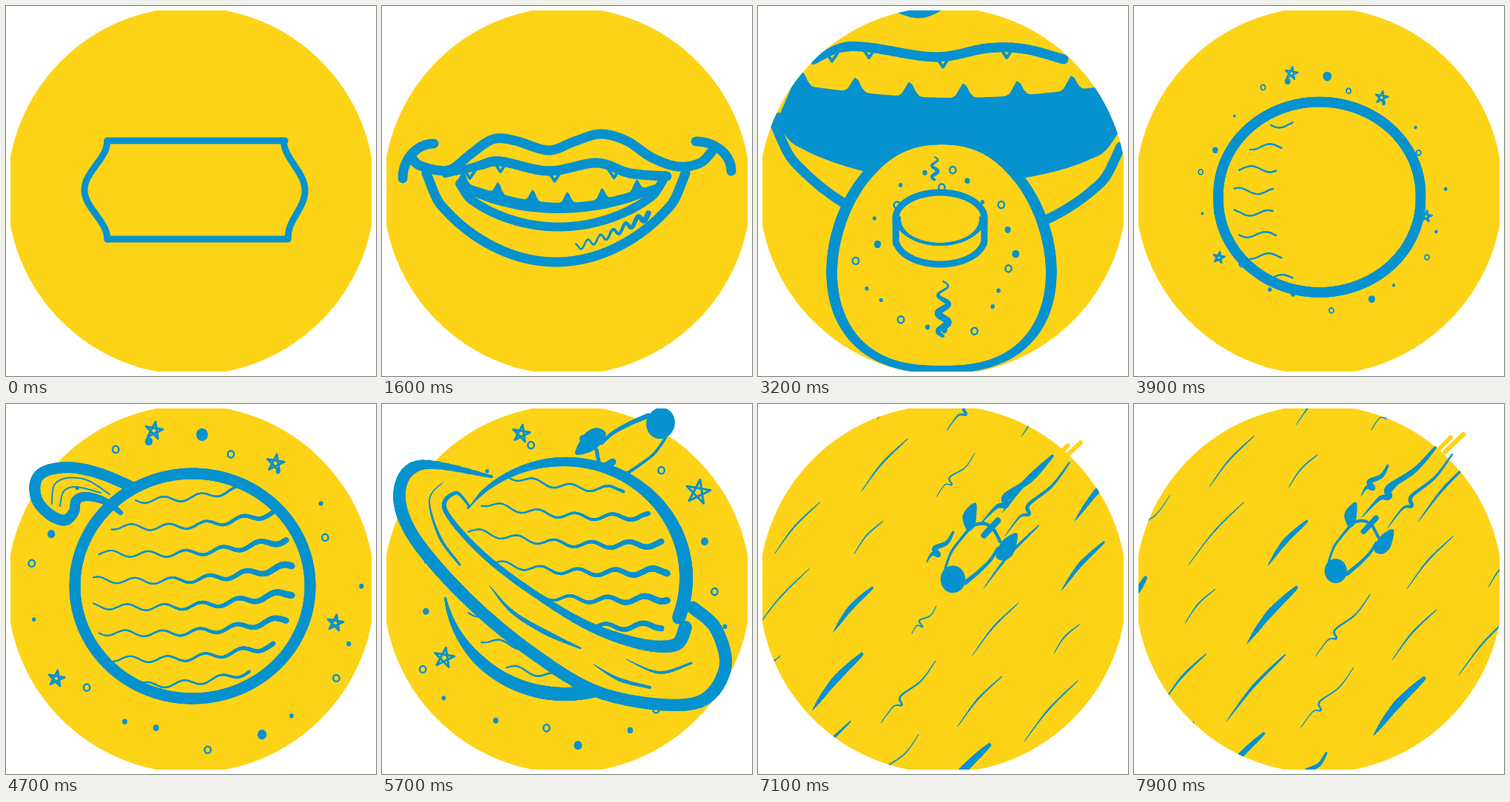
Write an HTML page with a canvas that moves like this. It is 500x500 px and loops after 8 s.

```html
<!DOCTYPE html>
<html lang="en">
<head>
<meta charset="utf-8">
<title>Mouth, planet, comet</title>
<style>
html, body { margin: 0; width: 100%; height: 100%; overflow: hidden; background: #fff; }
canvas { display: block; width: 500px; height: 500px; }
</style>
</head>
<body>
<canvas id="stage" width="500" height="500"></canvas>
<script>
const ctx = document.getElementById('stage').getContext('2d');
const BLUE = '#0692ce', YELLOW = '#fdd317', LOOP = 8000;
const { PI, sin, cos, abs, max, min, round, floor, sqrt } = Math;

// ---------- helpers ----------
const P = s => s.split(' ').map(q => q.split(',').map(Number));
const mix = (a, b, k) => Array.isArray(a) ? a.map((v, i) => mix(v, b[i], k)) : a + (b - a) * k;
const steps = (n, f) => Array.from({ length: n + 1 }, (_, i) => f(i / n, i));
const polar = (x, y, r, a) => [x + r * cos(a), y + r * sin(a)];

// Pose number k (may be fractional) from a list of poses
function pose(k, list) {
  const i = min(floor(k), list.length - 2);
  return mix(list[i], list[i + 1], k - i);
}

// Line between two points that sags by a rounded depth
const bow = (x0, y0, x1, y1, depth = 0, power = 0.6) => steps(24, u =>
  [mix(x0, x1, u), mix(y0, y1, u) + depth * max(0, sin(PI * u)) ** power]);

// Piecewise linear value from time/value pairs
function track(t, keys) {
  if (t <= keys[0]) return keys[1];
  for (let i = 2; i < keys.length; i += 2)
    if (t <= keys[i]) return mix(keys[i - 1], keys[i + 1], (t - keys[i - 2]) / (keys[i] - keys[i - 2]));
  return keys[keys.length - 1];
}

function random(seed) {
  return () => {
    seed = (seed * 16807) % 2147483647;
    return seed / 2147483647;
  };
}

function spline(p, closed) {
  const n = p.length, out = [], last = closed ? n : n - 1;
  const at = i => closed ? p[(i + n) % n] : p[max(0, min(n - 1, i))];
  for (let i = 0; i < last; i++) {
    const [a, b, c, d] = [at(i - 1), at(i), at(i + 1), at(i + 2)];
    for (let u = 0; u < 1; u += 0.125)
      out.push([0, 1].map(j => 0.5 * (2 * b[j] + (c[j] - a[j]) * u
        + (2 * a[j] - 5 * b[j] + 4 * c[j] - d[j]) * u * u
        + (3 * b[j] - a[j] - 3 * c[j] + d[j]) * u * u * u)));
  }
  out.push(at(last));
  return out;
}

function trace(s) {
  ctx.beginPath();
  s.forEach(p => ctx.lineTo(p[0], p[1]));
}

function stroke(s, w, color = BLUE) {
  trace(s);
  ctx.lineWidth = w;
  ctx.strokeStyle = color;
  ctx.stroke();
}

function fill(s, color = BLUE) {
  trace(s);
  ctx.fillStyle = color;
  ctx.fill();
}

// Brush line; w is one width or a width profile along the line
function ink(pts, w, to = 1) {
  const s = spline(pts), n = s.length - 1, end = round(n * to);
  if (end < 1) return;
  if (!Array.isArray(w)) return stroke(s.slice(0, end + 1), w);
  for (let i = 0; i < end; i++) {
    const f = i / n * (w.length - 1), k = floor(f);
    stroke([s[i], s[i + 1]], mix(w[k], w[min(k + 1, w.length - 1)], f - k));
  }
}

function dot(x, y, r, hollow) {
  ctx.beginPath();
  ctx.ellipse(x, y, r, r * 1.1, 0, 0, 7);
  ctx.fillStyle = ctx.strokeStyle = BLUE;
  ctx.lineWidth = 2.5;
  hollow ? ctx.stroke() : ctx.fill();
}

// Dots spread around a centre between two radii, one in three hollow
function scatter(seed, n, x, y, near, far, size) {
  const rnd = random(seed);
  for (let i = 0; i < n; i++) {
    const [px, py] = polar(x, y, mix(near, far, rnd()), i * 2.4 + seed);
    const hollow = i % 3 === 0;
    dot(px, py, hollow ? 4.2 : 2.5 + size * rnd() ** 2, hollow);
  }
}

const star = ([x, y, r]) => stroke(steps(5, (_, i) => polar(x, y, r, i * PI * 0.8 - 1.4)), 3);

function wave(x0, y0, x1, y1, w, { to = 1, amp = 4, len = 50, phase = -1.2 } = {}) {
  const span = x1 - x0;
  ink(steps(max(4, round(span / len * 6)), u => [mix(x0, x1, u),
    mix(y0, y1, u) + amp * sin(u * span / len * 2 * PI + phase) + span / 30 * sin(PI * u)]),
  [2, 2.5, w * 0.6, w], to);
}

// Slanted speed line, optionally with a lightning kink
function bolt([x0, y0], [x1, y1], w, kink) {
  const at = (u, side) => [mix(x0, x1, u) + side * 0.75, mix(y0, y1, u) + side * 0.66];
  ink(kink ? [at(0, 0), at(0.25, -2), at(0.33, 5), at(0.4, -4), at(0.7, 3), at(1, 0)]
    : [at(0, 0), at(0.5, -4), at(1, 0)], [1, w * 0.7, w, w * 0.8, w * 0.4]);
}

function scoped(draw) {
  ctx.save();
  draw();
  ctx.restore();
}

function disc() {
  ctx.beginPath();
  ctx.arc(250, 250, 248.3, 0, 7);
}

function inDisc(draw) {
  scoped(() => { disc(); ctx.clip(); draw(); });
}

// ---------- mouth ----------
const lipTop = P('40,205 50,215 75,222 95,220 120,200 150,180 180,182 225,195 260,183 295,173 330,182 365,205 400,217 430,212 447,195');
const innerTop = [P('85,228 130,216 160,210 225,223 290,212 335,226 385,230'),
  P('75,75 110,57 150,56 240,69 310,57 360,58 413,72')];

// Left (-1) or right (1) side: ticket notch that turns into a mouth corner
function side(dir, m) {
  const notch = u => dir < 0 ? [137 - 31 * sin(PI * u) ** 2, 182 + 133 * u]
    : [375 + 26 * sin(PI * u) ** 2 + 6 * u, 182 + 132 * u];
  const corner = u => dir < 0 ? [70 - 42 * sin(u * PI / 2), 233 - 47 * cos(u * PI / 2)]
    : [424 + 48 * sin(u * PI / 2), 223 - 40 * cos(u * PI / 2)];
  return steps(12, u => mix(notch(u), corner(u), m));
}

// Row of rounded lower teeth with narrow peaks between them
const teeth = (x0, x1, y, depth, peak) => steps(90, u => [mix(x0, x1, u),
  y + depth * sin(PI * u) - peak * abs(cos(PI * (u * 6 - 0.15))) ** 16]);

function mouth(t) {
  const m = track(t, [400, 0, 500, 0.1, 700, 0.4, 800, 0.7, 900, 0.9, 1000, 1]);
  const p = track(t, [1600, 0, 1900, 0.03, 2300, 0.15, 2800, 0.32, 3000, 0.6, 3200, 1]);
  const w = mix(9, 13, m);
  const zoom = pts => mix(pts, pts.map(([x, y]) => [250 + (x - 245) * 1.7, 10 + (y - 195) * 2.5]), p);

  const top = steps(14, u => [mix(137, 377, u), 182]);
  ink(zoom(mix(top, lipTop, m)), w);
  ink(zoom(side(-1, m)), w);
  ink(zoom(side(1, m)), w);
  ink(mix(mix(bow(137, 315, 381, 315), bow(60, 226, 410, 226, 120), m), bow(22, 158, 490, 190, 140), p), w);
  if (t < 900) return;

  const to = track(t, [800, 0, 1000, 0.7, 1200, 1]);
  const inner = mix(...innerTop, p);
  ink(inner, [8, 13, 13, 13, 13, 13], to);
  ink(mix(bow(105, 240, 380, 235, 61), bow(28, 150, 484, 165, 75, 0.5), p), 12, to);
  if (t < 1200) return;

  fill([...mix(teeth(103, 384, 236, 30, 15), teeth(48, 486, 106, 18, 20), p),
    ...mix(bow(384, 236, 103, 240, 42), bow(486, 165, 28, 150, 78, 0.5), p)]);
  const line = spline(inner);
  [0.12, 0.33, 0.52, 0.76].forEach(u => {
    const [x, y] = line[round(u * (line.length - 1))];
    stroke([[x - 8, y + 2], [x, y + 14], [x + 8, y + 2]], 4);
  });
  if (t < 2200) wave(262, 326, 360, 282, 7, { to: track(t, [1200, 0.3, 1600, 1]), amp: 5, len: 17 });
}

// ---------- tongue ----------
const tongueEdge = steps(60, u => {
  const a = 2 * PI * u, s = sin(a);
  return [248 + Math.sign(s) * 147 * abs(s) ** 0.8 * (1 - 0.12 * cos(a)), 338 - 153 * cos(a)];
});
const wiggle = (y0, y1, amp, turns) => steps(turns * 6, u =>
  [mix(239, 250, (y0 - 205) / 165) + amp * sin(2 * PI * turns * u), mix(y0, y1, u)]);

function tongue(t) {
  const s = track(t, [2000, 0.12, 2100, 0.25, 2300, 0.5, 2800, 0.82, 3200, 1]);
  ctx.translate(250, 185 + (1 - s) * 110);
  ctx.scale(s, s);
  ctx.translate(-250, -185);
  fill(tongueEdge, YELLOW);
  ink(tongueEdge, [4, 14, 15, 14, 10, 10, 14, 15, 14, 4]);
  ink(wiggle(204, 235, 4, 2), [1.5, 3, 5, 3]);
  ink(wiggle(372, 446, 7, 3), [2, 3, 7, 9, 9, 4]);
  scatter(11, 22, 248, 330, 85, 125, 3);
  if (t < 3400) globe(pill, 9, 9, [180, 360], [180, 0]);
  if (t < 3400) rim(pill, 1);
}

// ---------- planet ----------
// Body: centre x, y, radii, and how far the lower half is pushed down
const pill = [246, 287, 60, 35, 27];
const bodies = [[252, 246, 159, 152, 0], [247, 235, 164, 157, 0], [251, 232, 173, 154, 0]];
// Start and end angles of the drawn outline, above and below the ring
const upperArc = [[180, 385], [217, 380], [217, 388]];
const lowerArc = [[180, 25], [170, 65], [170, 80]];
const upperInk = [Array(8).fill(15), [3, 8, 12, 13, 15, 17, 18, 18], [3, 8, 16, 20, 20, 3, 14, 18]];
const lowerInk = [Array(4).fill(15), [3, 15, 18, 18], [3, 15, 20, 22]];

const arc = ([x, y, rx, ry, drop], [from, to]) => steps(30, u => {
  const a = mix(from, to, u) * PI / 180, s = sin(a);
  return [x + rx * cos(a), y + ry * s + (s > 0.01 ? drop : 0)];
});

function globe(body, wUp, wLow, up, low) {
  fill(arc(body, [0, 360]), YELLOW);
  ink(arc(body, up), wUp);
  ink(arc(body, low), wLow);
}

const rim = ([x, y, rx, ry], to) => ink(arc([x, y, rx - 3, ry, 0], [180, 0]), [8, 4, 4, 4, 8], to);

function stripes([x, y, rx, ry], slope, to) {
  for (let i = 0; i < 8; i++) {
    const v = (i - 3.5) * 0.235, half = rx * 0.85 * sqrt(1 - v * v);
    wave(x - half, y + v * ry - slope, x + half, y + v * ry + slope, 3 + 6 * cos(v * 1.7), { to, phase: i * 1.3 });
  }
}

function planet(t) {
  const k = track(t, [4700, 0, 5600, 1, 5900, 1, 6300, 2]);
  const born = track(t, [3300, 0, 3700, 0.55, 4100, 1]);
  const body = mix(pill, pose(k, bodies), born);
  const w = list => mix(list[0].map(() => 9), pose(k, list), born);
  globe(body, w(upperInk), w(lowerInk), pose(k, upperArc), pose(k, lowerArc));
  if (t < 3900) rim(body, track(t, [3500, 1, 3900, 0.3]));
  if (t >= 3900) stripes(body, pose(k, [-9, 9, 2]), track(t, [3800, 0.1, 4500, 1]));
  if (t >= 4300 && t <= 4700) bud(track(t, [4200, 0.1, 4700, 1]));
  if (t > 4700) ring(t, k);
}

// ---------- ring ----------
const ringOut = [
  P('148,98 55,82 24,115 40,175 110,258 200,334 300,392 420,405 463,360 452,305 420,275'),
  P('150,97 50,83 25,120 40,185 110,264 200,332 290,382 400,405 445,365 435,318 405,308')];
const ringIn = [
  P('118,138 100,120 86,145 150,215 260,290 340,322 395,326 410,302'),
  P('122,122 102,116 88,145 150,222 235,285 310,320 380,355 408,353')];
const budEdge = P('172,113 130,95 90,86 55,90 40,105 42,130 60,150 80,157 92,145 95,130 110,125 135,132 155,147');

function bud(s) {
  const grown = pts => mix(pts.map(() => [165, 128]), pts, s);
  ink(grown(budEdge), [15, 15, 15, 15, 14, 12, 6]);
  ink(grown(P('62,135 65,110 82,100 110,103 140,122')), 2);
  ink(grown(P('73,138 78,118 95,112 128,120')), 2);
}

function ring(t, k) {
  const f = max(0, k - 1), to = track(t, [4700, 0.3, 5000, 0.62, 5400, 1]);
  const out = mix(...ringOut, f), inn = mix(...ringIn, f);
  const cut = pts => {
    const s = spline(pts);
    return s.slice(0, round((s.length - 1) * to) + 1);
  };
  const a = cut(out), b = cut(inn).reverse();
  fill([...a, ...b], YELLOW);
  if (to < 1) {
    const p = a[a.length - 1], q = b[0], [x, y] = mix(p, q, 0.5);
    ink([p, [x + 12, y + 8], q], 13);
  }
  ink(out, mix([4, 16, 17, 17, 16, 16, 17, 17, 17], [4, 8, 8, 9, 11, 14, 17, 18, 18], f), to);
  ink(inn, mix([3, 5, 7, 9, 14, 17, 18], [3, 4, 6, 9, 9, 12, 16], f), to);
  if (to > 0.8 && k < 1.4) {
    ink(P('82,106 64,130 78,180 105,217'), [1, 2, 4, 3]);
    ink(P('145,245 175,280 220,308 268,330'), [1, 5, 7, 2]);
    ink(P('330,345 375,363 418,350'), [1, 4, 3]);
    ink(P('286,352 320,372 362,383'), [1, 5, 4]);
  }
}

// ---------- sky ----------
const skies = [
  { from: 3900, ref: 4700, seed: 5, size: 6, stars: P('200,36,12 364,80,12 445,296,11 68,371,11') },
  { from: 5200, ref: 5700, seed: 8, size: 6, stars: P('188,40,12 427,119,17 84,343,14') },
  { from: 6000, ref: 6300, seed: 3, size: 7, stars: [] }];

function sky(t) {
  const set = skies.filter(s => t >= s.from).pop();
  if (!set) return;
  const zoom = track(t, [3800, 0.7, 4500, 1]), drift = t > 4500 ? (t - set.ref) * 0.03 : 0;
  ctx.translate(250 - drift, 250 + drift);
  ctx.scale(zoom, zoom);
  ctx.translate(-250, -250);
  set.stars.forEach(star);
  scatter(set.seed, 20, 250, 250, 190, 234, set.size);
}

// ---------- animal ----------
function mane() {
  fill(spline(P('300,150 312,55 365,30 415,65 405,140 412,172 350,185'), true), YELLOW);
  [[369, 26], [386, 36], [404, 31]].forEach(([x, y]) => stroke([[x, y], [x + 2, y + 20]], 13, YELLOW));
  for (let i = 0; i < 10; i++) {
    const reach = 80 + 62 * sin(PI * (0.2 + i * 0.075)), a = -1.75 + i * 0.16;
    ink([[0.4, 0], [0.8, -0.08], [0.7, 0.05], [1, 0.02]].map(([r, da]) => polar(325, 158, reach * r, a + da)), [3, 5, 5, 3]);
  }
}

function tail() {
  stroke([[408, 64], [428, 44]], 6, YELLOW);
  stroke([[420, 64], [445, 40]], 6, YELLOW);
  bolt([308, 152], [407, 58], 9, true);
  bolt([338, 128], [392, 78], 4);
  bolt([343, 166], [430, 67], 5, true);
}

function head(x, y, s, turn, hair) {
  if (hair === tail) scoped(() => {
    ctx.translate(x - 272, y - 224);
    tail();
  });
  scoped(() => {
    ctx.translate(x, y);
    ctx.rotate(turn);
    ctx.scale(s, s);
    ctx.translate(-235, -280);
    if (hair === mane) mane();
    fill(spline(P('222,255 250,200 272,172 300,164 322,176 334,206 315,240 265,285')), YELLOW);
    ink(P('220,258 232,225 250,200 268,178'), [5, 5, 6]);
    ink(P('262,288 290,265 315,240 330,216'), [9, 7, 6]);
    ink(P('278,168 300,164 320,175 335,202'), 7);
    fill(spline(P('284,121 266,132 256,152 266,179 280,172 285,148'), true));
    fill(spline(P('371,185 347,194 331,214 327,236 346,241 364,224'), true));
    stroke(P('330,158 301,189'), 13);
    dot(236, 281, 26);
  });
}

// ---------- speed lines ----------
function streaks(t) {
  const rnd = random(21), n = 30, [dx, dy] = [0.66, -0.75];
  const grow = track(t, [6600, 0.2, 7000, 1]);
  for (let i = 0; i < n; i++) {
    const w = 2 + 9 * rnd() ** 2, half = (25 + 35 * rnd()) * grow;
    const across = 470 * (i / (n - 1) - 0.5);
    const along = (i * 0.618 * 600 + (t - 7000) * 0.9) % 600 - 300;
    const x = 250 + along * dx - across * dy, y = 250 + along * dy + across * dx;
    bolt([x - half * dx, y - half * dy], [x + half * dx, y + half * dy], w, i % 3 === 0);
  }
}

// ---------- frame ----------
function draw(t) {
  ctx.fillStyle = '#fff';
  ctx.fillRect(0, 0, 500, 500);
  ctx.beginPath();
  ctx.rect(6, 6, 488, 488);
  ctx.clip();
  disc();
  ctx.fillStyle = YELLOW;
  ctx.fill();

  if (t < 3900) inDisc(() => {
    const z = track(t, [3200, 1, 3700, 2, 3900, 2.6]);
    ctx.translate(250, 275);
    ctx.scale(z, z);
    ctx.translate(-250, -mix(275, 300, min(1, z - 1)));
    mouth(t);
    if (t >= 2100) scoped(() => tongue(t));
  });

  if (t >= 3400 && t < 6800) scoped(() => {
    const away = track(t, [6300, 0, 6500, 60, 6800, 430]);
    ctx.translate(away, -away);
    scoped(() => sky(t));
    if (t >= 5300 && t < 6000)
      head(track(t, [5300, 318, 5600, 362, 5700, 377, 5900, 440]),
        track(t, [5300, 100, 5600, 40, 5700, 27, 5900, -40]), 0.74, 3.42);
    planet(t);
  });

  if (t >= 6700) inDisc(() => streaks(t));
  if (t >= 6100) {
    const bob = t < 7000 ? 0 : 6 * sin((t - 7900) / 130);
    head(track(t, [6100, 385, 6300, 235, 6500, 226, 6800, 250, 7200, 266, 7900, 272]) + bob,
      track(t, [6100, 95, 6300, 280, 6500, 282, 6800, 252, 7200, 232, 7900, 225]) - bob,
      track(t, [6100, 0.85, 6300, 1, 6500, 0.95, 6800, 0.72, 7200, 0.62, 7900, 0.58]), 0,
      t < 6700 ? mane : tail);
  }
}

// A new drawing every tenth of a second, with regular held drawings in between
const held = new Set(steps(13, (_, i) => floor(20.25 + 4.45 * i)));
const exposures = [0, 5, 7, 8, 9, 10, 12, 14, 16, 19];
for (let e = 21; e < 80; e++) if (!held.has(e)) exposures.push(e);

ctx.lineCap = ctx.lineJoin = 'round';
const start = performance.now();
let shown = -1;
function tick() {
  const now = (performance.now() - start) % LOOP;
  const t = 100 * exposures.filter(e => e * 100 <= now).pop();
  if (t !== shown) scoped(() => draw(shown = t));
  requestAnimationFrame(tick);
}
tick();
</script>
</body>
</html>
```
